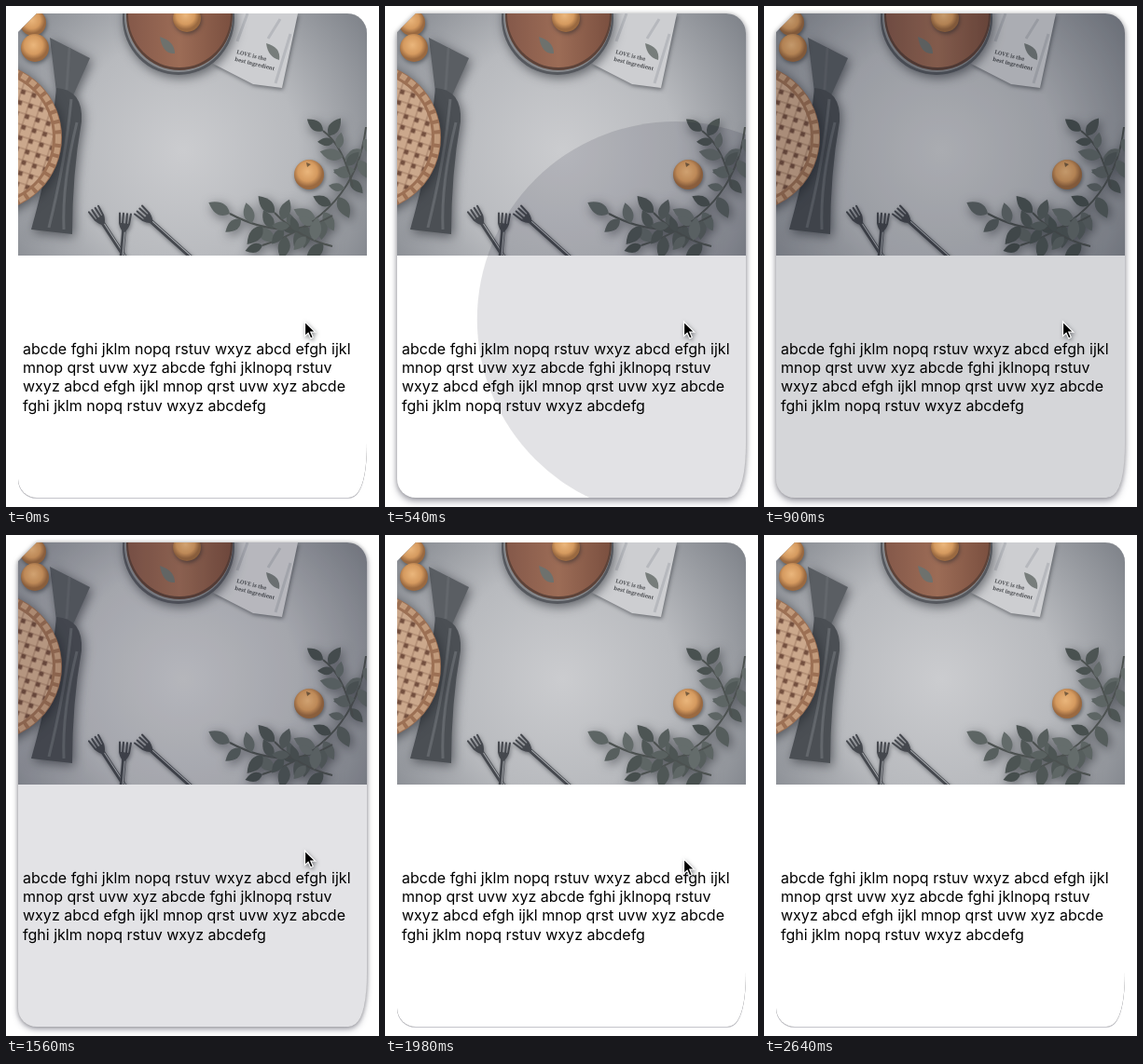
An HTML page that plays this animation: 400 by 538 pixels, repeating every 2760 ms.

```html
<!DOCTYPE html>
<html lang="en">
<head>
<meta charset="utf-8">
<title>Card ripple</title>
<style>
  html, body { margin: 0; width: 100%; height: 100%; overflow: hidden; background: #fff; }
  svg { display: block; width: 100%; height: 100%; }
  .copy { font: 16.05px Inter, "Liberation Sans", sans-serif; }
  .motto { font: bold 5.7px "Noto Serif", serif; fill: #4a4c50; }
  .soft { filter: drop-shadow(2px 3px 6px rgba(30, 33, 40, .6)); }
  .thin { filter: drop-shadow(1px 2px 2px rgba(30, 33, 40, .5)); }
</style>
</head>
<body>
<svg viewBox="0 0 400 538">
  <defs>
    <path id="card" d="M33 8H366A21 21 0 0 1 387 29V468Q387 528 367 528H33A20 20 0 0 1 13 508V28Z"/>
    <clipPath id="cardClip"><use href="#card"/></clipPath>
    <clipPath id="photoClip"><path d="M13 8H387V268H13Z"/></clipPath>
    <radialGradient id="stone" gradientUnits="userSpaceOnUse" cx="190" cy="155" r="245">
      <stop offset="0" stop-color="#cbcccf"/>
      <stop offset=".5" stop-color="#b8babe"/>
      <stop offset="1" stop-color="#7d8188"/>
    </radialGradient>
    <radialGradient id="peel" cx=".45" cy=".4">
      <stop offset="0" stop-color="#eab67c"/>
      <stop offset=".65" stop-color="#d59a5f"/>
      <stop offset="1" stop-color="#9a6940"/>
    </radialGradient>
    <linearGradient id="wood" x2="1">
      <stop stop-color="#85594a"/>
      <stop offset=".5" stop-color="#9c6c56"/>
      <stop offset="1" stop-color="#7b5040"/>
    </linearGradient>
    <pattern id="lattice" width="12" height="12" patternUnits="userSpaceOnUse" patternTransform="rotate(18)">
      <path d="M0 0H12V12H0Z" fill="#74503f"/>
      <path d="M4 0V12M0 4H12" stroke="#cba88c" stroke-width="7"/>
      <path d="M8 0V8H0" fill="none" stroke="#a07a62"/>
    </pattern>
    <path id="leaf" d="M0 0Q8 -11 21 0Q8 10 0 0Z"/>
    <g id="fork" fill="none" stroke="#45484e" stroke-linecap="round">
      <path d="M-6 0L-5 11Q-3 17 0 19Q3 17 5 11L6 0M-2 0V15M2 0V15" stroke-width="2"/>
      <path d="M-4 11H4L0 19Z" fill="#45484e"/>
      <path d="M0 18V75" stroke-width="4.5"/>
      <path d="M1 20V75" stroke="#a9acb0"/>
    </g>
  </defs>

  <use id="base" href="#card" fill="#fff"/>
  <g clip-path="url(#cardClip)">
    <g clip-path="url(#photoClip)">
      <path d="M13 8H387V268H13Z" fill="url(#stone)"/>
      <g class="soft" fill="#4b4f54">
        <path d="M47 34L90 56L72 96L54 92Z" fill="#5a5e63"/>
        <path d="M54 88Q83 90 81 124Q71 180 71 245L27 240Q48 165 50 125Z"/>
        <path d="M70 100Q64 165 46 238M76 125Q60 190 62 240M68 45L65 90" fill="none" stroke="#63676c" stroke-width="3"/>
      </g>
      <g class="soft">
        <circle cx="-20" cy="141" r="80" fill="#9c7054"/>
        <circle cx="-20" cy="141" r="76" fill="none" stroke="#c19a7b" stroke-width="6" stroke-dasharray="7 4"/>
        <circle cx="-20" cy="141" r="70" fill="url(#lattice)"/>
      </g>
      <path class="thin" d="M242 8H313L309 27L296 88L265 84L222 62L239 40Z" fill="#cdced1"/>
      <path d="M259 8L248 38M294 14L281 35M305 30L289 83" stroke="#b6b8bd" stroke-width="3"/>
      <g class="motto" transform="translate(247 51) rotate(14)">
        <text>LOVE is the</text><text y="8">best ingredient</text>
      </g>
      <path d="M279 40Q295 44 293 58Q281 55 279 40Z" fill="#777d7b"/>
      <g class="soft">
        <ellipse cx="185" cy="13" rx="60" ry="61" fill="#55585e"/>
        <ellipse cx="185" cy="11" rx="58" ry="60" fill="#85878b"/>
        <ellipse cx="186" cy="10" rx="57" ry="59" fill="#5d4238"/>
        <ellipse cx="186" cy="9" rx="55" ry="57" fill="url(#wood)"/>
      </g>
      <path d="M165 33Q181 38 181 51Q168 52 165 33Z" fill="#6e716d"/>
      <g class="thin">
        <use href="#fork" transform="translate(94 218) rotate(-33)"/>
        <use href="#fork" transform="translate(128 223) rotate(5)"/>
        <use href="#fork" transform="translate(142 219) rotate(-48)"/>
      </g>
      <g class="soft" id="branches" fill="none" stroke-width="2"></g>
      <g class="thin" fill="url(#peel)">
        <circle cx="29" cy="18" r="14"/>
        <circle cx="31" cy="45" r="15"/>
        <circle cx="194" cy="13" r="15"/>
        <circle cx="325" cy="181" r="16"/>
      </g>
      <path d="M322 168L327 170L323 173Z" fill="#795d3e"/>
    </g>
    <circle id="ripple" fill="#04081c"/>
  </g>
  <text class="copy" y="374">
    <tspan x="18">abcde fghi jklm nopq rstuv wxyz abcd efgh ijkl</tspan>
    <tspan x="18" dy="20.2">mnop qrst uvw xyz abcde fghi jklnopq rstuv</tspan>
    <tspan x="18" dy="20.2">wxyz abcd efgh ijkl mnop qrst uvw xyz abcde</tspan>
    <tspan x="18" dy="20.2">fghi jklm nopq rstuv wxyz abcdefg</tspan>
  </text>
  <path id="cursor" class="thin" d="M0 0V15.5L3.6 12.2L6.2 18L8.8 16.8L6.3 11.2H11.2Z" stroke="#fff" stroke-width="1.2"/>
</svg>
<script>
const $ = id => document.getElementById(id);
const clamp = v => Math.max(0, Math.min(1, v));
const mix = (a, b, p) => a + (b - a) * p;
const LOOP = 2760, STEP = 60;

let seed = 7;
const random = () => (seed = seed * 16807 % 2147483647) / 2147483647;

// A quadratic stem from a to c, with leaves on alternating sides
function branch(a, b, c, count) {
  let out = `<path d="M${a}Q${b} ${c}" stroke="#4c5150"/>`;
  for (let i = 0; i < count; i++) {
    const s = (i + 1) / count;
    const from = [0, 1].map(k => mix(a[k], b[k], s));
    const to = [0, 1].map(k => mix(b[k], c[k], s));
    const [x, y] = [0, 1].map(k => mix(from[k], to[k], s));
    const along = Math.atan2(to[1] - from[1], to[0] - from[0]) * 180 / Math.PI;
    const turn = s < 1 ? (i % 2 ? 1 : -1) * mix(35, 80, random()) : 0;
    const shade = mix(68, 104, random());
    out += `<use href="#leaf" fill="rgb(${shade},${shade + 8},${shade + 7})"
      transform="translate(${x} ${y}) rotate(${along + turn}) scale(${mix(0.8, 1.25, random())})"/>`;
  }
  return out;
}

$('branches').innerHTML =
  branch([386, 130], [375, 225], [275, 257], 15) +
  branch([350, 225], [300, 255], [240, 223], 10) +
  branch([372, 195], [362, 150], [340, 134], 7) +
  branch([350, 258], [315, 250], [288, 222], 7);

// cubic-bezier(.4, 0, .2, 1)
function ease(x) {
  let lo = 0, hi = 1;
  for (let i = 0; i < 20; i++) {
    const s = (lo + hi) / 2, q = 1 - s;
    if (1.2 * q * q * s + 0.6 * q * s * s + s ** 3 < x) lo = s; else hi = s;
  }
  return lo * lo * (3 - 2 * lo);
}

function draw(t) {
  const lift = Math.min(clamp((t - 300) / 180), clamp((1740 - t) / 210));
  $('base').style.filter =
    `drop-shadow(0 0 ${mix(0.6, 2.5, lift)}px rgba(0,0,0,${mix(0.5, 0.25, lift)})) ` +
    `drop-shadow(0 ${mix(1, 4, lift)}px ${mix(0.7, 3.5, lift)}px rgba(20,20,45,${mix(0.25, 0.34, lift)}))`;

  // The ripple grows while drifting from the touch point to the card's centre
  const p = ease(clamp((t - 472) / 368));
  const fade = Math.min(clamp((t - 472) / 97), clamp((1740 - t) / 270));
  const ripple = $('ripple');
  ripple.setAttribute('cx', mix(325, 200, p));
  ripple.setAttribute('cy', mix(345, 268, p));
  ripple.setAttribute('r', mix(198, 330, p));
  ripple.setAttribute('opacity', 0.165 * fade);

  const drop = 9 * Math.max(0, (t - 1920) / STEP) ** 1.5;
  $('cursor').setAttribute('transform', `translate(320.5 ${339 + drop})`);
}

function tick() {
  draw(Math.floor(performance.now() % LOOP / STEP) * STEP);
  requestAnimationFrame(tick);
}
tick();
</script>
</body>
</html>
```
